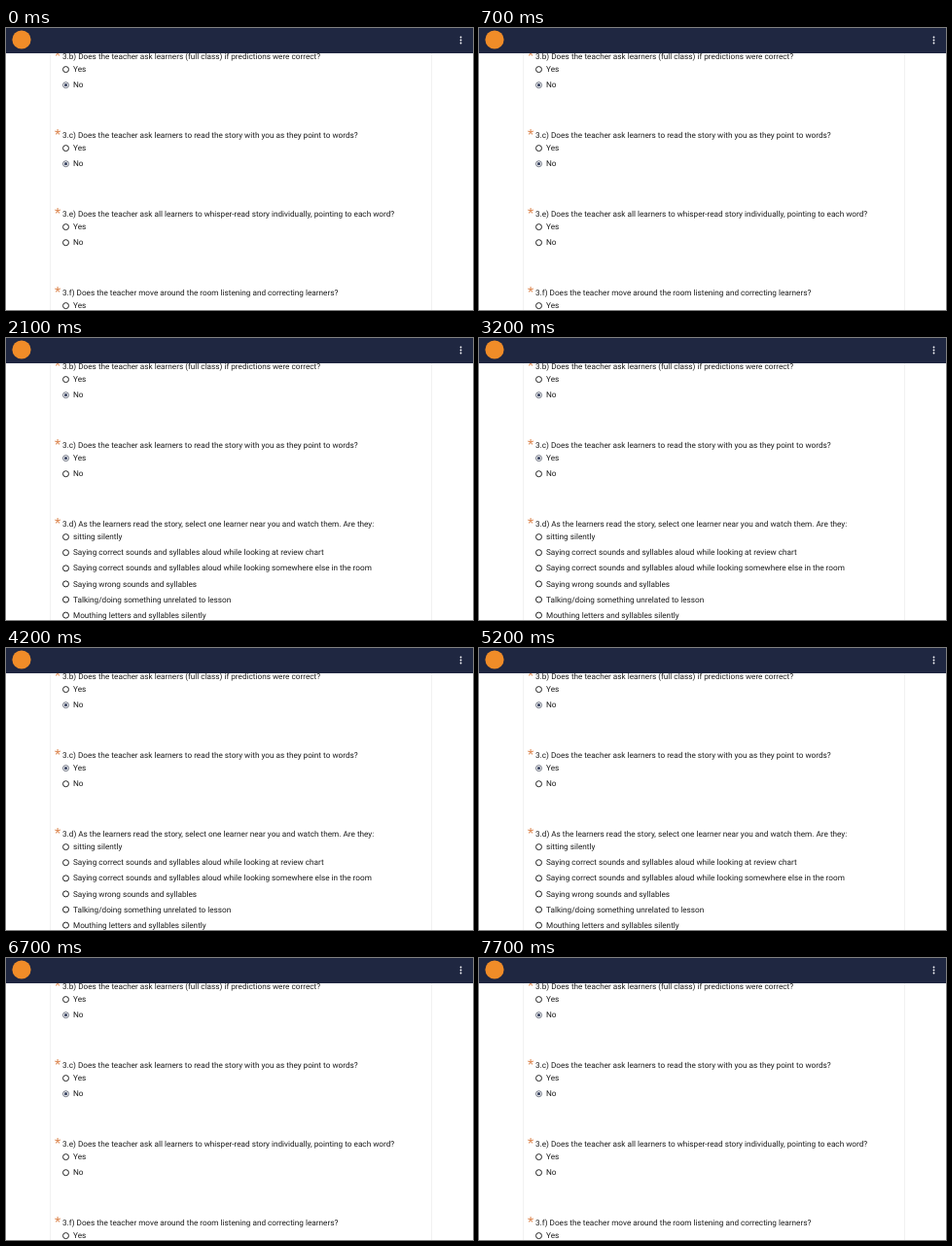
Recreate the animation shown at these times as an HTML page. Size 480 px wide and 290 px high, loop 8 s.

```html
<!DOCTYPE html>
<html lang="en">
<head>
<meta charset="utf-8">
<title>Lesson observation form</title>
<style>
  html, body { margin: 0; width: 100%; height: 100%; overflow: hidden; background: #fff; }
  svg { display: block; }
  text { font: 8.2px Roboto, sans-serif; fill: #1c1c1c; text-rendering: geometricPrecision; }
  .ring { fill: #fff; stroke: #222; stroke-width: 1; }
  .ring.on { stroke: #4c5263; stroke-width: .8; }
  .dot { fill: #3b4562; }
  .star { stroke: #df8f5c; stroke-width: 1.1; fill: none; }
</style>
</head>
<body>
<svg width="480" height="290" viewBox="0 0 480 290">
  <path d="M45.5 25V290M437.5 25V290" stroke="#f1f1f1"/>
  <g id="form"></g>
  <rect width="480" height="26" fill="#1f2741"/>
  <circle cx="16" cy="12" r="9.6" fill="#f08c28"/>
  <g fill="#fff">
    <circle cx="467.5" cy="9.5" r=".9"/>
    <circle cx="467.5" cy="12.5" r=".9"/>
    <circle cx="467.5" cy="15.5" r=".9"/>
  </g>
</svg>
<script>
const LOOP = 8000, YES_AT = 2100, NO_AT = 5300;
const BLOCK = 81, ROW = 16.1;
const yesNo = ["Yes", "No"];
const form = document.getElementById("form");

function star(x, y) {
  let d = "";
  for (let i = 0; i < 5; i++) {
    const a = (i * 72 - 90) * Math.PI / 180;
    d += `M${x} ${y}l${3 * Math.cos(a)} ${3 * Math.sin(a)}`;
  }
  return `<path class="star" d="${d}"/>`;
}

function option(label, y, on) {
  return `<circle class="ring${on ? " on" : ""}" cx="61.5" cy="${y + .3}" r="3"/>` +
    (on ? `<circle class="dot" cx="61.5" cy="${y + .3}" r="1.6"/>` : "") +
    `<text x="69" y="${y + 2.9}">${label}</text>`;
}

function question([title, options, chosen], index) {
  const y = 29 + index * BLOCK;
  return star(53.1, y - 3) + `<text x="58" y="${y + 3}">${title}</text>` +
    options.map((label, i) => option(label, y + 13.3 + i * ROW, i === chosen)).join("");
}

const predictions = ["3.b) Does the teacher ask learners (full class) if predictions were correct?", yesNo, 1];
const reading = "3.c) Does the teacher ask learners to read the story with you as they point to words?";
const watching = ["3.d) As the learners read the story, select one learner near you and watch them. Are they:", [
  "sitting silently",
  "Saying correct sounds and syllables aloud while looking at review chart",
  "Saying correct sounds and syllables aloud while looking somewhere else in the room",
  "Saying wrong sounds and syllables",
  "Talking/doing something unrelated to lesson",
  "Mouthing letters and syllables silently"
]];
const whispering = ["3.e) Does the teacher ask all learners to whisper-read story individually, pointing to each word?", yesNo];
const moving = ["3.f) Does the teacher move around the room listening and correcting learners?", yesNo];

// Answering "Yes" to 3.c reveals 3.d in place of the later questions.
let shown;
function draw(now) {
  const t = now % LOOP;
  const yes = t >= YES_AT && t < NO_AT;
  if (yes !== shown) {
    shown = yes;
    const rest = yes ? [watching] : [whispering, moving];
    form.innerHTML = [predictions, [reading, yesNo, yes ? 0 : 1], ...rest].map(question).join("");
  }
}

const start = performance.now();
function frame() {
  draw(performance.now() - start);
  requestAnimationFrame(frame);
}
frame();
</script>
</body>
</html>
```
